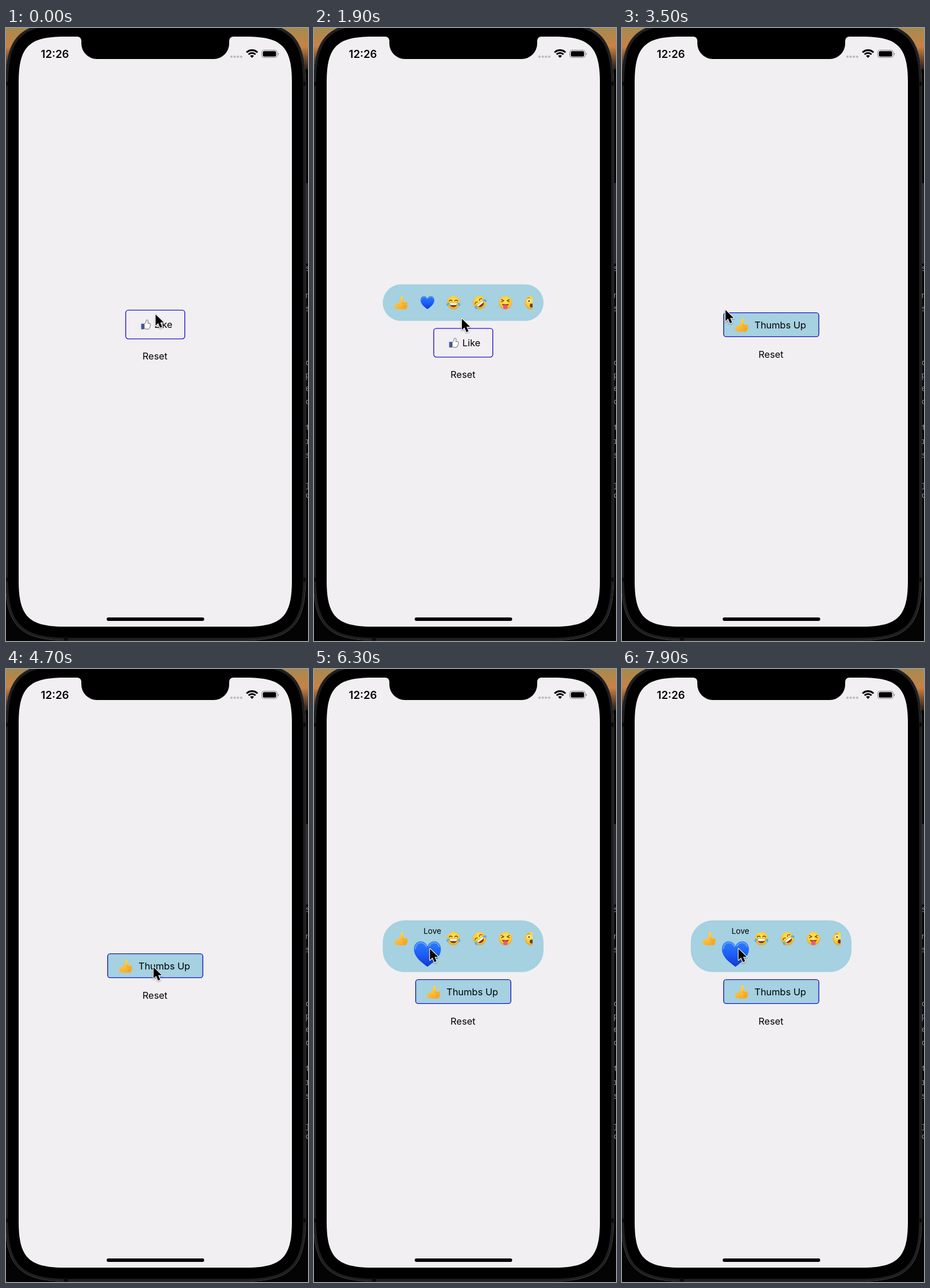
An HTML page that plays this animation: 525 px wide and 1067 px high, repeating every 8000 ms.

```html
<!DOCTYPE html>
<html lang="en">
<head>
<meta charset="utf-8">
<title>Reaction picker</title>
<style>
  html, body { margin: 0; width: 100%; height: 100%; overflow: hidden; background: #000; }
  svg { display: block; width: 525px; height: 1067px; }
  text { font: 16.4px Inter, "Open Sans", sans-serif; fill: #000; }
  .clock { font-size: 18.6px; font-weight: 600; }
  .label { font-size: 13.6px; }
  .code text { font: 14px "Noto Sans Mono", monospace; fill: #868686; }
</style>
</head>
<body>
<svg viewBox="0 0 525 1067" xmlns="http://www.w3.org/2000/svg">
  <defs>
    <linearGradient id="wall" x2="0" y2="1">
      <stop offset="0" stop-color="#a58a50"/><stop offset=".45" stop-color="#c98245"/><stop offset="1" stop-color="#2a1a14"/>
    </linearGradient>
    <linearGradient id="skin" x2=".4" y2="1">
      <stop offset="0" stop-color="#ffdd55"/><stop offset="1" stop-color="#f7ad2c"/>
    </linearGradient>
    <linearGradient id="blue" x2="0" y2="1">
      <stop offset="0" stop-color="#2f7bfa"/><stop offset=".55" stop-color="#1c5df5"/><stop offset="1" stop-color="#0f35d4"/>
    </linearGradient>
    <radialGradient id="face" cy=".4" r=".62">
      <stop offset="0" stop-color="#ffe65c"/><stop offset=".65" stop-color="#fecd3a"/><stop offset="1" stop-color="#ec981d"/>
    </radialGradient>
    <clipPath id="rowClip"><path d="M100-40H380V40H100Z"/></clipPath>

    <g id="thumb">
      <path fill="url(#skin)" d="M-11.500 2.500C-9 2-6.500 1.800-5 .5C-2.500-2-1.200-5-1-9.500C-1-13 3.300-12.600 3.700-8.500C4-6 3.400-3.500 3-1.500H9Q11.200-.5 10.200 2Q12 4 10 5.700Q11.200 8 8.700 9Q9 11.500 6.300 11.800H-2C-5 11.800-7 10-11.500 10.500Z"/>
      <path fill="none" stroke="#dc9420" stroke-width=".8" stroke-linecap="round" d="M3-1.500Q1.500-.5 2.300 1.500M3 2H9.500M3 5.500H9.500M3.500 9H8"/>
    </g>
    <g id="heart">
      <path fill="url(#blue)" d="M0 11.300C-4 8.500-12 3-12-4.300C-12-8.500-9.300-11.300-6.200-11.300C-3.200-11.300-1-9.500 0-6.800C1-9.500 3.200-11.300 6.200-11.300C9.300-11.300 12-8.500 12-4.300C12 3 4 8.500 0 11.300Z"/>
      <path fill="none" stroke="#6fb0ff" stroke-width="1" stroke-linecap="round" opacity=".75" d="M-10.800-4.500Q-10.500-9.500-6.300-10.200Q-2.500-10-.8-6.500M1.300-7Q3-10.200 6.300-10.200Q9.500-9.800 10.500-6.500"/>
    </g>
    <circle id="disc" r="11.5" fill="url(#face)"/>
    <g id="laugh">
      <path fill="none" stroke="#7a4310" stroke-width="1.300" stroke-linecap="round" d="M-7.500-2.500Q-4.800-6.500-2-2.700M7.500-2.500Q4.800-6.500 2-2.700"/>
      <path fill="#7a3d14" d="M-7 .5H7Q6.500 8 0 8T-7 .5Z"/>
      <path fill="#fff" d="M-6.500 .8H6.500Q6.200 3 5.300 4.200H-5.300Q-6.200 3-6.500 .8Z"/>
      <path fill="#4db4f3" d="M-7.500-.5Q-13 1-12 4.800Q-9.500 7.500-8 4Q-7.300 2-7.500-.5ZM7.500-.5Q13 1 12 4.800Q9.500 7.500 8 4Q7.300 2 7.500-.5Z"/>
    </g>
    <g id="joy"><use href="#disc"/><use href="#laugh"/></g>
    <g id="rolling"><use href="#disc"/><use href="#laugh" transform="rotate(-38)"/></g>
    <g id="tongue">
      <use href="#disc"/>
      <path fill="none" stroke="#7a4310" stroke-width="1.300" stroke-linecap="round" stroke-linejoin="round" d="M-7-5.500L-2.700-3.500-7-1.500M7-5.500L2.700-3.500 7-1.500"/>
      <path fill="#7a3d14" d="M-6 2.200Q0 3.800 6 2.200Q5.500 6 0 6T-6 2.200Z"/>
      <path fill="#f0587e" d="M-3.800 4.500Q0 3.500 3.800 4.500V8Q3.500 11.500 0 11.500T-3.800 8Z"/>
    </g>
    <g id="wow">
      <use href="#disc"/>
      <circle cx="-4.500" cy="-3" r="2.700" fill="#fff"/><circle cx="-4.200" cy="-2.800" r="1.500" fill="#5b2f0c"/>
      <ellipse cy="5" rx="3" ry="3.500" fill="#7a3d14"/>
      <path fill="none" stroke="#b0741f" d="M-7.500-7.500Q-5-9.500-2.500-8"/>
    </g>
  </defs>

  <rect width="525" height="1067" fill="#040404"/>
  <rect width="525" height="72" fill="url(#wall)"/>
  <path fill="#29292b" d="M519 270H525V410H519Z"/>
  <g class="code" id="code"></g>

  <!-- phone -->
  <path id="body" stroke="#4b4b4d"/>
  <path id="rim" fill="none" stroke="#1f1f21" stroke-width="4"/>
  <path stroke="#0a0a0a" stroke-width="7" d="M0 97H4M517 97H521M0 960H4M517 960H521M101 1063H108"/>
  <path id="screen" fill="#f1eff2"/>
  <path d="M124 14V15A7 7 0 0 1 131 22V27A27 27 0 0 0 158 54H361A27 27 0 0 0 388 27V22A7 7 0 0 1 395 15V14Z"/>
  <rect x="175" y="1026" width="169.500" height="6" rx="3"/>
  <text class="clock" x="85" y="52" text-anchor="middle">12:26</text>
  <path stroke="#bbb9bc" stroke-width="4.200" stroke-linecap="round" stroke-dasharray="0 5.600" d="M392 50H409"/>
  <path fill="none" stroke="#000" stroke-width="3.100" d="M418.200 42.500A13.500 13.500 0 0 1 437.200 42.500M421.700 46A8.500 8.500 0 0 1 433.700 46"/>
  <path d="M427.700 52L424.300 48.600A4.800 4.800 0 0 1 431.100 48.600Z"/>
  <rect x="444.500" y="38.500" width="27" height="13" rx="4" fill="none" stroke="#858387"/>
  <rect x="446.500" y="40.300" width="23" height="9.400" rx="2.500"/>
  <path d="M473 43Q475.500 45 473 47.500Z" fill="#777"/>

  <!-- picker -->
  <g id="panel">
    <rect id="pill" x="119.500" width="279.500" fill="#a5d1e1"/>
    <g id="row" transform="translate(0 31.700)" clip-path="url(#rowClip)"></g>
    <use id="big"/>
    <text id="label" class="label" y="23.500"></text>
  </g>
  <g id="like">
    <rect x="208.200" y=".6" width="102.600" height="50" rx="4.500" fill="none" stroke="#1d15d2" stroke-width="1.400"/>
    <path fill="#3f5c9d" stroke="#3b4a70" stroke-width=".6" d="M235.300 24.500H240V33.500H235.300Z"/>
    <path fill="#fff" stroke="#55565c" stroke-width=".9" stroke-linejoin="round" d="M240.300 25Q243.800 22.500 244 18.500Q244.300 17 246 17.600Q247.800 18.500 246.500 23.500H250Q251.800 24.500 250.800 26.500Q251.500 28.200 250.200 29.500Q250.500 31.200 249 32Q249 33.600 247 33.600H243L240.300 32.300Z"/>
    <text x="258" y="31.700">Like</text>
  </g>
  <g id="chosen">
    <rect x="176.700" y=".6" width="165.500" height="41.800" rx="4.500" fill="#a5d1e1" stroke="#1616c9" stroke-width="1.400"/>
    <use href="#thumb" x="208.500" y="22"/>
    <text x="230.300" y="27.500">Thumbs Up</text>
  </g>
  <text id="reset" x="259" text-anchor="middle">Reset</text>

  <path id="cursor" stroke="#fff" stroke-width="2.400" stroke-linejoin="round" paint-order="stroke" d="M0 .5V20L4.500 15.800L7.900 23.800L11.500 22.300L8.200 14.500H14.300Z" style="filter:drop-shadow(0 1px 1px #0006)"/>
</svg>
<script>
const $ = id => document.getElementById(id);
const LOOP = 8000, STEP = 100;
const emojis = ["thumb", "heart", "joy", "rolling", "tongue", "wow"];
const slot = i => 152 + i * 45.2;

$("row").innerHTML = emojis.map((e, i) => `<use href="#${e}" x="${slot(i)}"/>`).join("");
$("code").innerHTML = [[418, "s"], [465, "n"], [488, "s"], [582, "c"], [604, "p"], [627, "e"], [650, "c"],
  [695, "t"], [719, "r"], [743, "s"], [798, "l"], [813, "c"]]
  .map(([y, c]) => `<text x="520.500" y="${y + 5}">${c}</text>`).join("");

// Rectangle with continuous-curvature corners of nominal radius r.
function smoothRect(id, l, t, r, b, radius) {
  const n = radius * 1.38, c = n - radius * .32 * 3.35;
  $(id).setAttribute("d", `M${l} ${t + n}C${l} ${t + c} ${l + c} ${t} ${l + n} ${t}H${r - n}` +
    `C${r - c} ${t} ${r} ${t + c} ${r} ${t + n}V${b - n}C${r} ${b - c} ${r - c} ${b} ${r - n} ${b}` +
    `H${l + n}C${l + c} ${b} ${l} ${b - c} ${l} ${b - n}Z`);
}
smoothRect("body", -1, -10, 521, 1066, 80);
smoothRect("rim", 1.5, -7.5, 518.5, 1063.5, 77.5);
smoothRect("screen", 22, 15, 497, 1042, 57.6);

// time, panel height, thumb chosen, enlarged slot (-1 for none)
const states = [
  [0, 0, false, -1], [1200, 63.5, false, -1], [2900, 90, false, 0], [3000, 0, true, -1],
  [5100, 63.5, true, -1], [6200, 90, true, 1]
];
const cursorPath = [[0, 260, 498], [400, 260, 498], [1100, 261.5, 506.5], [1800, 261.5, 506.5], [2600, 157.5, 482],
  [3100, 157.5, 482], [4400, 256.5, 518.5], [5000, 256.5, 518.5], [5500, 228.5, 492], [6000, 201.5, 486.5],
  [6700, 201.5, 486.5], [7600, 202.5, 486.5]];
const buttonFade = [[0, 1], [1000, 1], [1100, .2], [1200, .35], [1500, 1], [4800, 1], [5000, .2], [5100, .35], [5400, 1]];
const emojiFade = [[0, .25], [1200, .25], [1500, 1], [5000, 1], [5100, .25], [5400, 1]];

function sample(keys, t) {
  const i = keys.findIndex(k => k[0] > t);
  if (i < 0) return keys[keys.length - 1].slice(1);
  const a = keys[i - 1], b = keys[i], p = (t - a[0]) / (b[0] - a[0]), e = p * p * (3 - 2 * p);
  return a.slice(1).map((v, n) => v + (b[n + 1] - v) * e);
}
const move = (id, x, y) => $(id).setAttribute("transform", `translate(${x} ${y})`);
const show = (id, on) => $(id).style.display = on ? "" : "none";

function draw(t) {
  const [, height, chosen, grown] = states.filter(s => s[0] <= t).pop();
  const top = (chosen ? 495 : 490.5) + height / 2;
  const panelTop = top - 12.4 - height;

  show("panel", height);
  show("like", !chosen);
  show("chosen", chosen);
  move("panel", 0, panelTop);
  move("like", 0, top);
  move("chosen", 0, top);
  $("pill").setAttribute("height", height);
  $("pill").setAttribute("rx", Math.min(38, height / 2));
  $("reset").setAttribute("y", top + (chosen ? 43 : 51.3) + 35.6);

  $("like").style.opacity = $("chosen").style.opacity = sample(buttonFade, t)[0];
  $("row").style.opacity = sample(emojiFade, t)[0];

  [...$("row").children].forEach((e, i) => e.style.display = i === grown ? "none" : "");
  show("big", grown >= 0);
  show("label", grown >= 0);
  if (grown >= 0) {
    $("big").setAttribute("href", "#" + emojis[grown]);
    $("big").setAttribute("transform", `translate(${slot(grown)} 58.500) scale(1.95)`);
    $("label").textContent = ["Thumbs Up", "Love"][grown];
    $("label").setAttribute("x", slot(grown) - 6.8);
  }
  move("cursor", ...sample(cursorPath, t));
}

function tick() {
  draw(Math.floor(performance.now() % LOOP / STEP) * STEP);
  requestAnimationFrame(tick);
}
tick();
</script>
</body>
</html>
```
